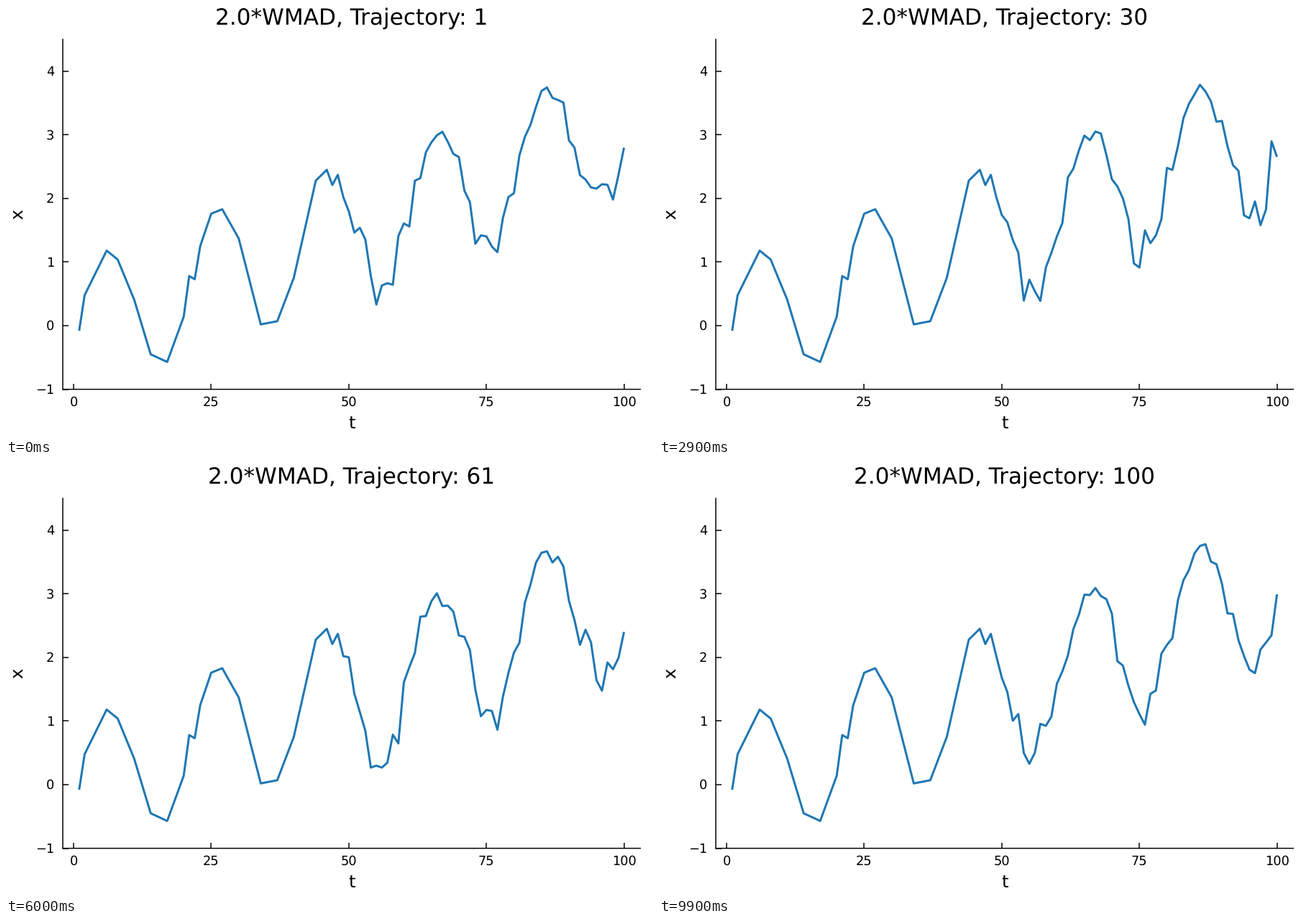
A matplotlib script that plays this animation: 900 by 600 pixels, repeating every 10 s.

```python
import numpy as np
import matplotlib.pyplot as plt
from matplotlib.animation import FuncAnimation

W, H, DPI = 900, 600, 100
PX = 72 / DPI          # one pixel in points
FONT = 2.22            # pixels per nominal font point
FRAMES, INTERVAL = 100, 100
LEFT, RIGHT, TOP, BOTTOM = 79, 882.4, 46.4, 533.6
X_MIN, X_MAX, Y_MIN, Y_MAX = -1.97, 102.97, -1, 4.5

plt.rcParams["font.family"] = "DejaVu Sans"
plt.rcParams["text.hinting"] = "none"

# Turning points of the shared history
KEYS = [(1, -0.08), (2, 0.48), (6, 1.18), (8, 1.04), (11, 0.41), (14, -0.45),
        (17, -0.57), (20, 0.14), (21, 0.78), (22, 0.73), (23, 1.25),
        (25, 1.76), (27, 1.83), (30, 1.37), (34, 0.02), (37, 0.07),
        (40, 0.75), (44, 2.28), (46, 2.45), (47, 2.21), (48, 2.37), (49, 2.02)]

t = np.arange(1, 101)
past, future = t[:49], t[49:]
history = np.interp(past, *zip(*KEYS))


def forecast(i):
    """Sampled continuation: trend, seasonal wave and noise."""
    rng = np.random.default_rng(1000 + i)
    wave = np.cos(2 * np.pi * (future - 6.1) / 20)
    noise = (0.16 - 0.07 * wave) * rng.standard_normal(future.size)
    return -0.1 + 0.0315 * future + 1.08 * wave + noise


def px_x(v):
    return LEFT + (v - X_MIN) / (X_MAX - X_MIN) * (RIGHT - LEFT)


def px_y(v):
    return BOTTOM - (v - Y_MIN) / (Y_MAX - Y_MIN) * (BOTTOM - TOP)


fig = plt.figure(figsize=(W / DPI, H / DPI), dpi=DPI, facecolor="white")


def label(x, y, text, size, **kw):
    kw = {"ha": "center", "va": "baseline", **kw}
    return fig.text(x / W, 1 - y / H, text, fontsize=size * FONT * PX,
                    color="black", **kw)


ax = fig.add_axes([LEFT / W, 1 - BOTTOM / H, (RIGHT - LEFT) / W, (BOTTOM - TOP) / H])
ax.set_xlim(X_MIN, X_MAX)
ax.set_ylim(Y_MIN, Y_MAX)
ax.set_xticks(range(0, 101, 25))
ax.set_yticks(range(-1, 5))
ax.tick_params(direction="in", length=8 * PX, width=1.5 * PX,
               labelbottom=False, labelleft=False)
for side, spine in ax.spines.items():
    spine.set_visible(side in ("left", "bottom"))
    spine.set_linewidth(1.5 * PX)
    spine.set_snap(False)

for v in range(0, 101, 25):
    label(px_x(v), 557, str(v), 8)
for v in range(-1, 5):
    label(67, px_y(v) + 6.2, str(v).replace("-", "\u2212"), 8, ha="right")

label(480.7, 588, "t", 11)
label(23.5, 290, "x", 11, rotation=90, rotation_mode="anchor")
title = label(480.7, 27, "", 14)
line, = ax.plot([], [], color="#1f77b4", lw=3 * PX,
                solid_joinstyle="round", solid_capstyle="butt")


def update(i):
    line.set_data(t, np.concatenate([history, forecast(i)]))
    title.set_text(f"2.0*WMAD, Trajectory: {i + 1}")
    return line, title


anim = FuncAnimation(fig, update, frames=FRAMES, interval=INTERVAL,
                     repeat=True, repeat_delay=0)
plt.show()
```
